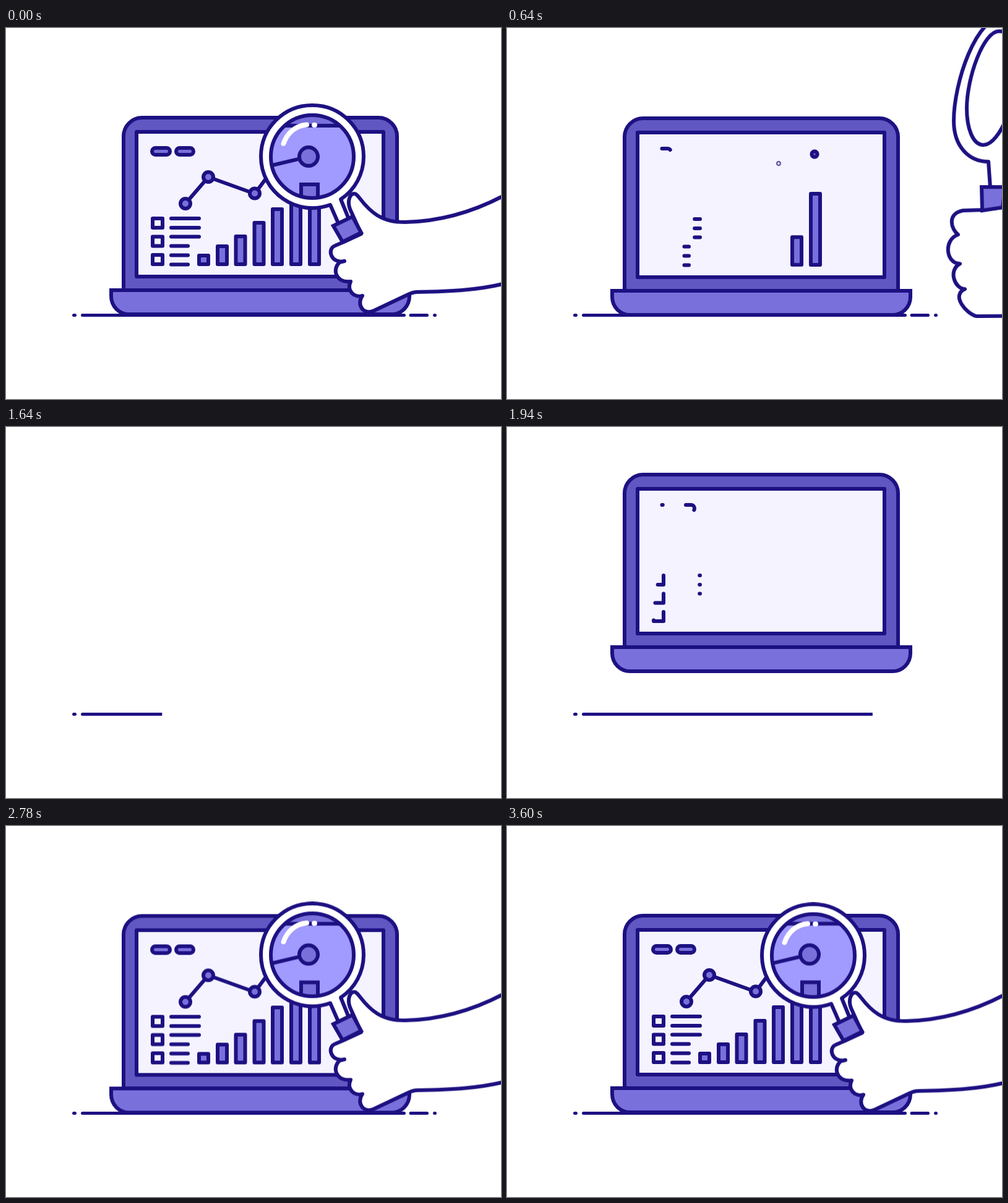
Recreate the animation shown at these times as an HTML page without scripts. Size 800 px wide and 600 px high, loop 3.62 s.

```html
<!DOCTYPE html>
<html lang="en">
<head>
<meta charset="utf-8">
<title>Laptop chart under a magnifier</title>
<style>
  @property --bob { syntax: "<length>"; inherits: true; initial-value: 0px; }

  html, body { margin: 0; width: 100%; height: 100%; overflow: hidden; background: #fff; }
  svg { display: block; width: 800px; height: 600px; }

  svg {
    --ink: #1d1182; --lid: #6157c3; --body: #7970db; --screen: #f5f3ff; --glass: #a19aff;
    --loop: 3620ms;
    stroke: var(--ink); stroke-width: 6; fill: none;
  }
  svg * { vector-effect: non-scaling-stroke; }

  .laptop, .lid, .base, .legs, .sweep, .swing, .morph, .view, .trend, .bars *, .points *, .draw, .magnifier {
    animation: var(--loop) linear infinite;
  }

  /* Ground line: wiped out to the right, then drawn from the left */
  .sweep { animation-name: sweep; }
  @keyframes sweep {
    0%, 29.3% { transform: none; animation-timing-function: ease-in-out; }
    37.3% { transform: translateX(589px); }
    37.31%, 37.8% { transform: translateX(-589px); animation-timing-function: cubic-bezier(.4, 0, .6, 1); }
    60%, 100% { transform: none; }
  }

  /* Laptop */
  .laptop { animation-name: hop; }
  @keyframes hop {
    0% { transform: translateY(-1px); }
    9%, 46.5% { transform: none; animation-timing-function: cubic-bezier(.3, 0, .4, 1); }
    53.6% { transform: translateY(-69px); animation-timing-function: cubic-bezier(.5, 0, .6, 1); }
    60%, 70% { transform: none; }
    83%, 100% { transform: translateY(-1px); }
  }
  .lid { animation-name: fold; transform-origin: 411px 425px; }
  @keyframes fold {
    0%, 19.3% { transform: none; animation-timing-function: ease-in; }
    24%, 48% { transform: scaleY(0); animation-timing-function: ease-out; }
    52.5%, 100% { transform: none; }
  }
  .base { animation-name: flip; transform-origin: 411px 444.5px; }
  @keyframes flip {
    0%, 23.5% { transform: translateY(0) scaleY(1); }
    25.97% { transform: translateY(-13px) scaleY(-1.04); animation-timing-function: ease-in; }
    29.3%, 45.6% { transform: translateY(19px) scaleY(0); animation-timing-function: ease-out; }
    49%, 100% { transform: translateY(0) scaleY(1); }
  }
  .legs { animation-name: legs; opacity: 0; }
  @keyframes legs {
    0%, 25.2% { opacity: 0; }
    25.21%, 28% { opacity: 1; }
    28.01%, 100% { opacity: 0; }
  }

  /* Screen content */
  .draw, .trend { stroke-dasharray: 1 2; stroke-linecap: round; }
  .draw { animation-name: draw; animation-delay: calc(var(--wait, 0) * 1ms - var(--loop)); }
  @keyframes draw {
    0%, 12% { stroke-dashoffset: 0; fill-opacity: 1; }
    13% { fill-opacity: 0; }
    16.5%, 51.4% { stroke-dashoffset: 1.01; animation-timing-function: cubic-bezier(.2, .5, .5, 1); }
    56% { fill-opacity: 0; }
    59.7%, 100% { stroke-dashoffset: 0; fill-opacity: 1; }
  }
  .late { --wait: 77; }
  .trend { animation-name: trend; stroke-linejoin: round; }
  @keyframes trend {
    0%, 11% { stroke-dashoffset: 0; }
    17%, 62.7% { stroke-dashoffset: 1.02; }
    69.3%, 100% { stroke-dashoffset: 0; }
  }
  .bars *, .points * { transform-box: fill-box; fill: var(--body); }
  .bars * {
    animation-name: grow; transform-origin: 50% 100%;
    animation-delay: calc(var(--i) * 40ms - var(--loop));
  }
  @keyframes grow {
    0%, 9.53% { transform: none; animation-timing-function: ease-in; }
    13.26%, 58% { transform: scaleY(0); animation-timing-function: ease-out; }
    63.54% { transform: scaleY(1.17); animation-timing-function: ease-in-out; }
    67.96%, 100% { transform: none; }
  }
  .points * {
    animation-name: pop; transform-origin: center;
    animation-delay: calc(var(--i) * 50ms - var(--loop));
  }
  @keyframes pop {
    0%, 11% { transform: none; }
    13.8%, 63% { transform: scale(0); animation-timing-function: ease-out; }
    67.96% { transform: scale(1.1); animation-timing-function: ease-in-out; }
    71.8%, 100% { transform: none; }
  }

  /* Magnifier: drifts upward, swings out to the right and back in */
  .magnifier { animation-name: bob; transform: translateY(var(--bob)); }
  @keyframes bob {
    0% { --bob: 0px; }
    9.39%, 17.68% { --bob: -30px; }
    65%, 76.24% { --bob: 0px; animation-timing-function: ease-in-out; }
    82.5% { --bob: 19px; }
    86.19% { --bob: 20px; animation-timing-function: cubic-bezier(.333, 0, .667, .333); }
    100% { --bob: 0px; }
  }
  .steady { transform: translateY(calc(var(--bob) * -1)); }
  .parallax { transform: translateY(calc(var(--bob) * -.17)); }

  .swing { animation-name: swing; }
  @keyframes swing {
    0%, 17.68% { transform: none; }
    21%, 65.19% { transform: translate(250px, 20px); animation-timing-function: ease-out; }
    69.61%, 100% { transform: none; }
  }

  /* Each part bends between its facing shape and its turned-away shape */
  .morph { animation-name: morph; d: var(--facing); fill: #fff; stroke-linejoin: round; }
  @keyframes morph {
    0%, 9.39% { d: var(--facing); animation-timing-function: ease-in; }
    17.68%, 69.61% { d: var(--turned); animation-timing-function: cubic-bezier(.4, 0, .4, 1); }
    76.24%, 100% { d: var(--facing); }
  }
  .hand {
    --facing: path("M546 346L574 333L556 293C551 279 556 268 563 268C570 268 576 288 600 303C615 312 628 314 645 314C700 313 755 297 803 272L900 215L900 395L803 414C765 423 725 426 665 427Q658 427 650 431L595 457C577 465 566 447 576 433C563 437 550 425 557 410C534 413 526 391 539 379L547 377C525 382 518 357 532 352Z");
    --turned: path("M766 324L799 320L860 280C855 265 870 250 880 250C895 255 905 270 920 290C940 300 960 305 980 305C1040 305 1090 290 1140 270L1250 215L1250 495L1140 495C1080 495 1000 495 930 495Q910 495 890 495L757 496C740 492 715 462 738 452C722 452 710 422 730 411C707 411 703 372 727 364L727 364C716 356 708 330 735 325Z");
  }
  .rim {
    --facing: path("M538 318L524 286C470 306 412 266 412 208C412 162 449 125 495 125C541 125 578 162 578 208C578 236 564 262 541 277L554 309");
    --turned: path("M779 288L776 246C745 246 720 222 720 180C720 120 755 9 805 9C850 9 880 40 870 90C870 170 840 235 803 240L799 318");
  }
  .pane {
    --facing: path("M428 208C428 171 458 141 495 141C532 141 562 171 562 208C562 245 532 275 495 275C458 275 428 245 428 208Z");
    --turned: path("M741 160C741 110 768 35 793 35C815 35 825 60 825 90C825 140 795 219 768 219C750 219 741 190 741 160Z");
  }
  .grip {
    --facing: path("M529 320L560 305L574 331L544 346Z");
    --turned: path("M765 287L803 287L799 320L766 325Z");
  }
  .morph.grip { fill: var(--body); stroke-linejoin: miter; }
  .morph.pane { fill: none; }

  .view { animation-name: view; }
  @keyframes view {
    0%, 10% { opacity: 1; }
    13%, 72.5% { opacity: 0; }
    75.5%, 100% { opacity: 1; }
  }
</style>
</head>
<body>
<svg viewBox="0 0 800 600">
  <defs>
    <clipPath id="reveal"><rect class="sweep" x="107" y="455" width="589" height="20"/></clipPath>
    <clipPath id="lens"><circle cx="495" cy="208" r="67"/></clipPath>
  </defs>

  <g clip-path="url(#reveal)">
    <path d="M109.5 464.5h2M123.500 464.5H643.500M654 464.5h26.500M692.500 464.5h1" stroke-width="5" stroke-linecap="round"/>
  </g>

  <g class="laptop">
    <g class="lid">
      <path d="M190 425V176a30 30 0 0 1 30-30H602a30 30 0 0 1 30 30V425z" fill="var(--lid)"/>
      <rect x="211" y="169" width="399" height="234" fill="var(--screen)" stroke-linejoin="round"/>

      <g fill="var(--body)">
        <path class="draw late" pathLength="1" d="M250.500 195h9a5.500 5.500 0 0 1 0 11h-18a5.500 5.500 0 0 1 0-11z"/>
        <path class="draw" style="--wait:40" pathLength="1" d="M289 195h8.500a5.500 5.500 0 0 1 0 11h-17a5.500 5.500 0 0 1 0-11z"/>
      </g>
      <g stroke-linejoin="round">
        <path class="draw" style="--wait:24" pathLength="1" d="M253 309v15h-16v-15z"/>
        <path class="draw" style="--wait:12" pathLength="1" d="M253 338.500v15h-16v-15z"/>
        <path class="draw" pathLength="1" d="M253 368v15h-16v-15z"/>
      </g>
      <path class="draw late" pathLength="1" d="M312 309h-45"/>
      <path class="draw late" pathLength="1" d="M312 324h-45"/>
      <path class="draw late" pathLength="1" d="M312 338.500h-45"/>
      <path class="draw" style="--wait:90" pathLength="1" d="M294 353.500h-27"/>
      <path class="draw" style="--wait:90" pathLength="1" d="M294 368.500h-27"/>
      <path class="draw" style="--wait:90" pathLength="1" d="M294 383.500h-27"/>

      <g class="bars" stroke-linejoin="round">
        <rect style="--i:0" x="312" y="369" width="15" height="14"/>
        <rect style="--i:1" x="342" y="354" width="15" height="29"/>
        <rect style="--i:2" x="371.500" y="338" width="15" height="45"/>
        <rect style="--i:3" x="401.500" y="316" width="15" height="67"/>
        <rect style="--i:4" x="431" y="294" width="15" height="89"/>
        <rect style="--i:5" x="461" y="279" width="15" height="104"/>
        <rect style="--i:6" x="491" y="234" width="15" height="149"/>
      </g>

      <polyline class="trend" pathLength="1" points="290,285 327,242 402,269 439,219 497,204"/>
      <g class="points">
        <circle style="--i:0" cx="290" cy="285" r="8"/>
        <circle style="--i:1" cx="327" cy="242" r="8"/>
        <circle style="--i:2" cx="402" cy="268.500" r="8"/>
        <circle style="--i:3" cx="439" cy="219" r="8"/>
        <circle style="--i:4" cx="497" cy="204" r="8"/>
      </g>
    </g>
    <path class="base" d="M170 425H652V435a29 29 0 0 1-29 29H199A29 29 0 0 1 170 435z" fill="var(--body)"/>
    <path class="legs" d="M169.500 448V465M652 448V465"/>
  </g>

  <g class="magnifier">
    <g class="swing">
      <path class="morph hand"/>
      <path class="morph rim"/>
      <path class="morph grip"/>
      <g class="view">
        <g clip-path="url(#lens)">
          <g class="steady">
            <path d="M400 40H600V158H400z" fill="var(--body)" stroke="none"/>
            <path d="M400 158H600V320H400z" fill="var(--glass)" stroke="none"/>
            <path d="M400 118H600M400 158H600"/>
            <g class="parallax" fill="var(--body)">
              <rect x="477" y="253" width="27" height="100"/>
              <path d="M489 208L409 227"/>
              <circle cx="489" cy="208" r="15"/>
            </g>
          </g>
        </g>
        <path d="M448.500 187C454 171 467 158 486 156.500M498 157h1" stroke="#fff" stroke-width="8" stroke-linecap="round"/>
      </g>
      <path class="morph pane"/>
    </g>
  </g>
</svg>
</body>
</html>
```
